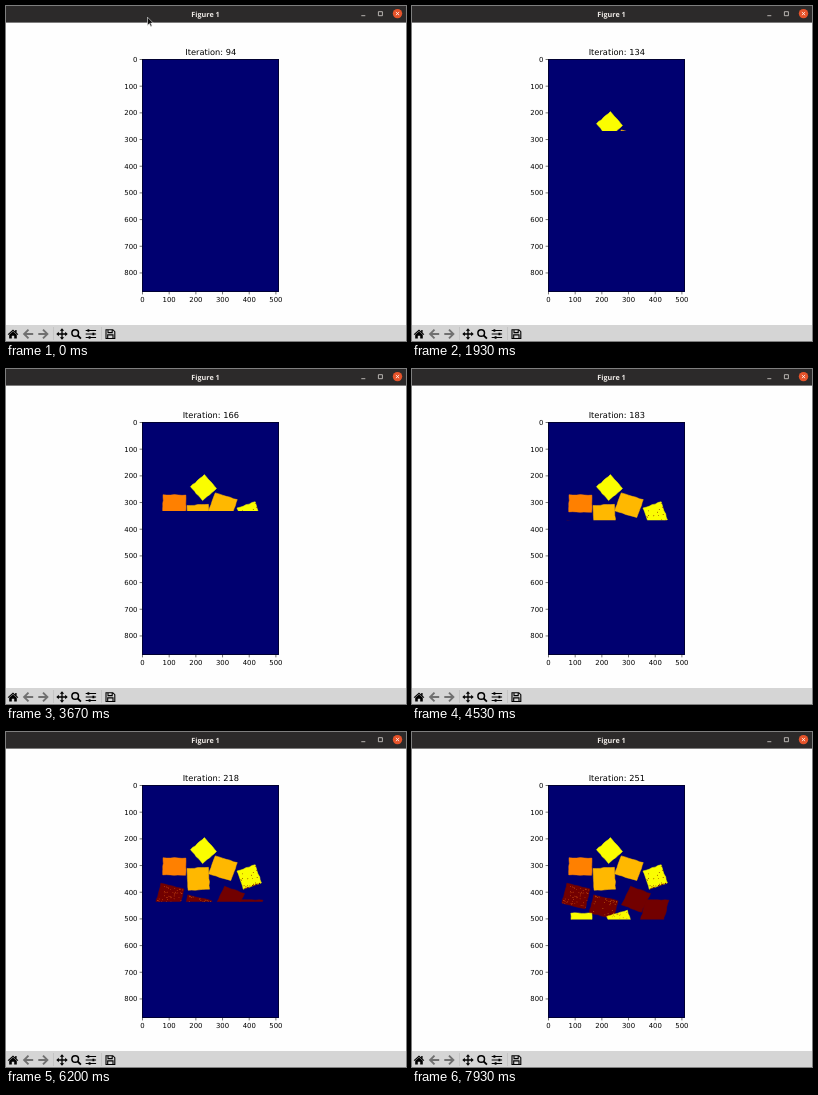
An HTML page for the animation above (8 s loop, 400x335 px).

```html
<!DOCTYPE html>
<html lang="en">
<head>
<meta charset="utf-8">
<title>Figure 1</title>
<style>
html, body { margin: 0; width: 100%; height: 100%; overflow: hidden; background: #fefefe; }
svg { display: block; width: 100%; height: 100%; }
text { font: 6.9px "DejaVu Sans", sans-serif; text-rendering: geometricPrecision; }
#title { font-size: 8.27px; }
#bar { font: bold 7.2px "Open Sans", sans-serif; fill: #eeeae6; }
.mid { text-anchor: middle; }
.end { text-anchor: end; }
.line { fill: none; stroke: #000; stroke-width: .55; }
</style>
</head>
<body>
<svg viewBox="0 0 400 335">
  <defs>
    <clipPath id="scan"><rect id="seen" x="136" y="53.5" width="137" height="0"/></clipPath>
  </defs>
  <rect width="400" height="335" fill="#fefefe"/>

  <rect width="400" height="16.6" fill="#2c2a2a"/>
  <text id="bar" class="mid" x="199.5" y="10.6">Figure 1</text>
  <path d="M355.3 9.7h4M372.4 5.7h4v4h-4z" fill="none" stroke="#d8d4d0" stroke-width=".8"/>
  <circle cx="391.5" cy="7.6" r="4.7" fill="#e6532a"/>
  <path d="M389.9 6l3.2 3.2m0-3.2l-3.2 3.2" stroke="#fff" stroke-width=".8"/>

  <text id="title" class="mid" x="204.8" y="49.2"></text>
  <rect x="136" y="53" width="137" height="233" fill="#000070"/>
  <g id="pieces" clip-path="url(#scan)"></g>
  <rect class="line" x="136.3" y="53.3" width="136.4" height="232.4"/>
  <g id="ticks"></g>

  <rect y="319" width="400" height="16" fill="#d5d5d5"/>
  <path d="M47.5 321v13M95.5 321v13" stroke="#bdbdbd" stroke-width=".7"/>
  <path d="M1.7 328.2L7 323.4l2.2 2v-1.5h1.4v2.8l1.7 1.5-.7.8-4.6-4.1-4.6 4.1zM3.2 328.7L7 325.4l3.8 3.3v3.9H8.2v-2.8H5.8v2.8H3.2z"/>
  <path d="M27.2 328H18.5M22.5 323.6L18.1 328l4.4 4.4M32.3 328H41M37 323.6l4.4 4.4-4.4 4.4" fill="none" stroke="#707070" stroke-width="1.9"/>
  <path d="M56 324v8M52 328h8" stroke="#000" stroke-width="1.3"/>
  <path d="M56 322.3l2.2 2.5h-4.4zM56 333.7l2.2-2.5h-4.4zM50.3 328l2.5-2.2v4.4zM61.7 328l-2.5-2.2v4.4z"/>
  <circle cx="69.2" cy="327" r="3.3" fill="none" stroke="#000" stroke-width="1.5"/>
  <path d="M71.6 329.4l3.3 3.3" stroke="#000" stroke-width="1.9"/>
  <path d="M79.7 324.5h10.4M79.7 328h10.4M79.7 331.5h10.4" stroke="#000"/>
  <path d="M82.4 323.2v2.6M87.4 326.7v2.6M83.6 330.2v2.6" stroke="#000" stroke-width="1.9"/>
  <path d="M100 323.7h6.8l2 2v6.8H100zM102 323.7v2.9h4.2v-2.9M101.7 332.4v-3.5h5.3v3.5" fill="none" stroke="#000" stroke-width="1.1"/>

  <path id="cursor" d="M141.5 11.2v8.2l1.9-1.8 1.3 3 1.3-.6-1.3-2.9h2.6z" fill="#111" stroke="#eee" stroke-width=".6"/>
</svg>
<script>
const $ = id => document.getElementById(id);
const LEFT = 136.5, TOP = 53.5, BOTTOM = 286, SCALE = 0.2668;

let seed = 7;
const rand = () => (seed = seed * 16807 % 2147483647) / 2147483647;

// Axis ticks
let ticks = '';
for (let v = 0; v <= 800; v += 100) {
  const x = LEFT + v * SCALE, y = TOP + v * SCALE;
  ticks += `<path class="line" d="M136 ${y}h-2.4"/><text class="end" x="131.5" y="${y + 2.5}">${v}</text>`;
  if (v <= 500)
    ticks += `<path class="line" d="M${x} ${BOTTOM}v2.4"/><text class="mid" x="${x}" y="296.4">${v}</text>`;
}
$('ticks').innerHTML = ticks;

// Outline of a w by h box around the origin, its sides slightly ragged
const outline = (w, h, steps = 6) => {
  const points = [];
  for (let i = 0; i < 4 * steps; i++) {
    const side = Math.floor(i / steps), f = i % steps / steps - 0.5;
    const wobble = f === -0.5 ? 0 : (rand() - 0.5) * 0.8;
    const [x, y] = [[f, -0.5], [0.5, f], [-f, 0.5], [-0.5, -f]][side];
    points.push([x * w + (side % 2 ? wobble : 0), y * h + (side % 2 ? 0 : wobble)]);
  }
  return points.map(p => p.map(n => n.toFixed(2))).join(' ');
};

// Random dots in the box; crowd > 0 draws them to the bottom edge, < 0 to the top
const specks = (w, h, color, count, crowd = 0) => {
  let d = '';
  for (let i = 0; i < count; i++) {
    const x = (rand() - 0.5) * (w - 1), depth = 0.5 - rand() ** (1 + Math.abs(crowd));
    const y = (crowd < 0 ? -depth : depth) * (h - 1);
    d += `M${x.toFixed(1)} ${y.toFixed(1)}h.8v.7h-.8z`;
  }
  return `<path fill="${color}" d="${d}"/>`;
};

// A tilted box given by its centre, size and angles, with optional specks
const piece = (color, x, y, w, h, turn, skew = 0, ...dots) =>
  `<g transform="translate(${x} ${y}) rotate(${turn}) skewX(${skew})">
    <polygon points="${outline(w, h)}" fill="${color}" stroke="${color}" stroke-width=".5" stroke-linejoin="round"/>
    ${dots.length ? specks(w, h, ...dots) : ''}
  </g>`;

const YELLOW = '#fbfd00', AMBER = '#ffb800', ORANGE = '#ff8000', RED = '#720000';
$('pieces').innerHTML =
  piece(YELLOW, 197.5, 118.6, 18.4, 18.4, -41) +
  piece(ORANGE, 168.3, 134.5, 22.8, 17.2, 1) +
  piece(AMBER, 192.3, 146.8, 21.4, 21.8, -3) +
  piece(AMBER, 217, 136.2, 23, 19, 17, -3) +
  piece(YELLOW, 243.2, 145, 19.2, 19.2, -19, 0, RED, 45, 6) +
  piece(RED, 164, 164, 24, 20.3, 14, 0, '#c84810', 55) +
  piece(RED, 224, 167.2, 21.3, 20.6, 20, -6) +
  piece(RED, 191.7, 174.8, 25, 18.4, 14, 0, '#d07010', 30, -1.5) +
  piece(RED, 242.7, 178.2, 23, 20.5, 1, -14) +
  piece(YELLOW, 169.3, 190.2, 21, 18, 0) +
  piece(YELLOW, 208, 190.9, 21.5, 20, -17, 0, '#d07010', 12, -4);

// Iteration count: steady pace between a few known moments, on a 15 fps tick
const keys = [[0, 94], [16, 118], [41, 150], [55, 166], [83, 204], [103, 232], [119, 251]];
const iteration = tick => {
  const i = Math.max(1, keys.findIndex(k => k[0] >= tick));
  const [t0, n0] = keys[i - 1], [t1, n1] = keys[i];
  return Math.floor(n0 + (n1 - n0) * (tick - t0) / (t1 - t0) + 1e-6);
};

const start = performance.now();
const draw = now => {
  const t = Math.max(0, now - start) % 8000;
  const tick = Math.min(119, Math.floor(t * 0.015 + 0.05));
  const n = iteration(tick);
  $('title').textContent = 'Iteration: ' + n;
  $('seen').setAttribute('height', 2 * n * SCALE);
  $('cursor').style.display = tick < 2 ? '' : 'none';
  requestAnimationFrame(draw);
};
draw(start);
</script>
</body>
</html>
```
